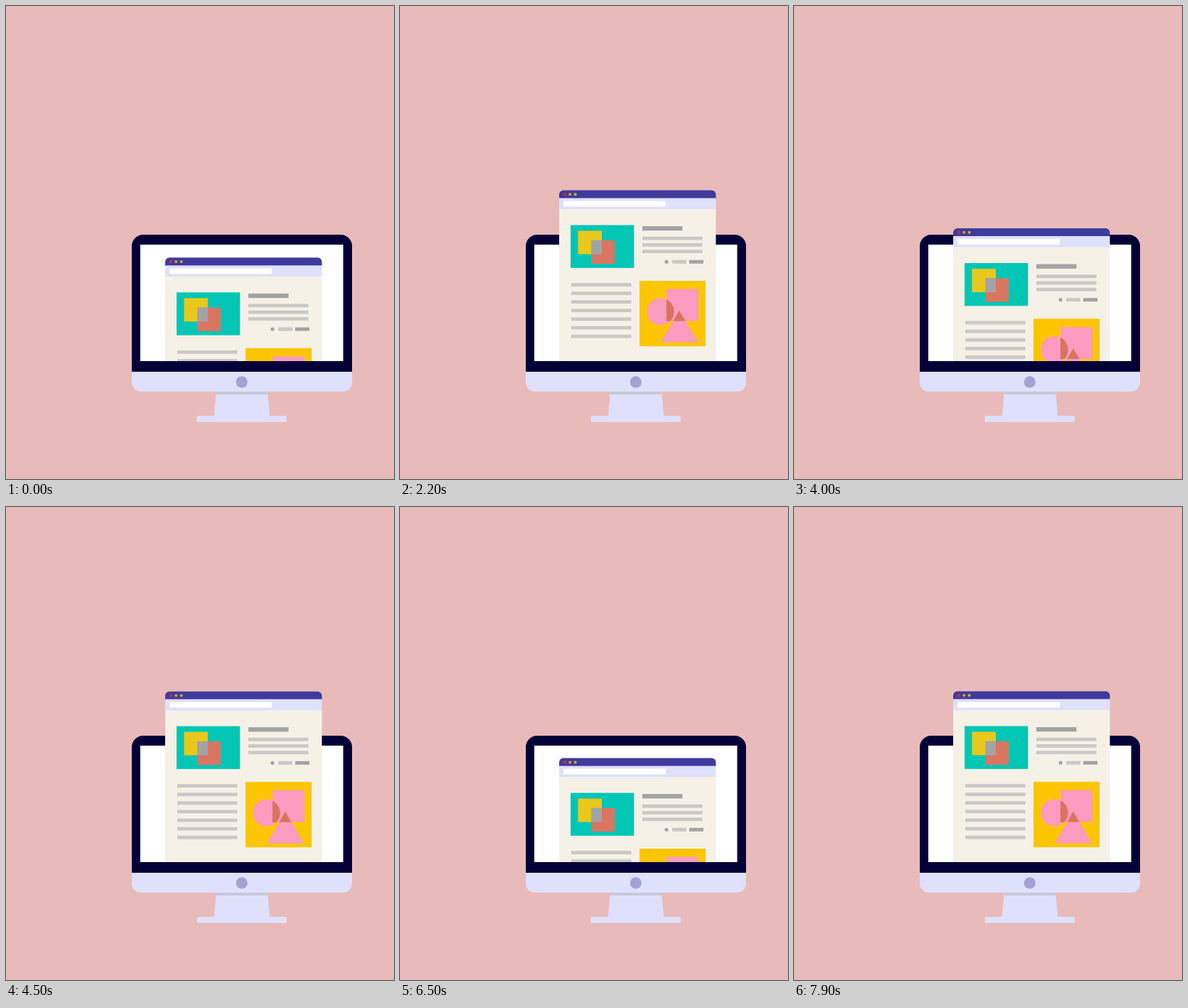
Animation, 546 px wide and 666 px high, one loop 8000 ms. Source, as an HTML page:

```html
<!DOCTYPE html>
<html lang="en">
<head>
<meta charset="utf-8">
<title>Scrolling page</title>
<style>
  html, body { margin: 0; width: 100%; height: 100%; overflow: hidden; background: #e8bbba; }
  svg { display: block; width: 546px; height: 666px; }
  .light { fill: #dfe0fb; }
  .line { fill: #c9c8c6; }
  .dark { fill: #a3a3a4; }
  .pink { fill: #fa9bbf; }
  .overlap { fill: #d9745c; }
</style>
</head>
<body>
<svg viewBox="0 0 546 666">
  <defs>
    <clipPath id="visible"><rect width="546" height="500"/></clipPath>
    <clipPath id="square"><rect x="375" y="139" width="45" height="45"/></clipPath>
  </defs>

  <!-- monitor -->
  <path class="light" d="M296 543H368L371.5 579H292.5Z"/>
  <path fill="#c8c9d8" d="M296 543H368L368.4 547H295.6Z"/>
  <rect class="light" x="268.5" y="577" width="126.5" height="8.7" rx="2"/>
  <path class="light" d="M177 514H487V530a13 13 0 0 1-13 13H190a13 13 0 0 1-13-13Z"/>
  <path fill="#030038" d="M177 515V338a16 16 0 0 1 16-16H471a16 16 0 0 1 16 16V515Z"/>
  <rect fill="#fff" x="189" y="336" width="285.5" height="164"/>
  <circle fill="#a5a1d5" cx="331.8" cy="529.4" r="8.1"/>

  <!-- web page, local y starts at its top edge -->
  <g clip-path="url(#visible)">
    <g id="page" transform="translate(0 354.3)">
      <path fill="#3f3b9d" d="M224 12V6a6 6 0 0 1 6-6H438.5a6 6 0 0 1 6 6V12Z"/>
      <circle fill="#d8252c" cx="232" cy="5.8" r="2.2"/>
      <circle fill="#e39a25" cx="239.3" cy="5.8" r="2"/>
      <circle fill="#b9b836" cx="246.7" cy="5.8" r="2"/>
      <rect class="light" x="224" y="11" width="220.5" height="16"/>
      <rect fill="#fff" x="230" y="15" width="144" height="8"/>
      <rect fill="#f5f1e6" x="224" y="26.5" width="220.5" height="260"/>

      <rect fill="#00c6b5" x="240" y="49" width="89.3" height="60.3"/>
      <rect fill="#e9c81c" x="250.5" y="57" width="33.5" height="33"/>
      <rect fill="#da7562" x="269" y="70.3" width="33" height="33.2"/>
      <rect fill="#a2a3a8" x="269" y="70.3" width="15" height="19.7"/>

      <rect class="dark" x="341" y="50.5" width="56.5" height="6.3"/>
      <circle class="dark" cx="375" cy="100.7" r="2.6"/>
      <rect class="line" x="383" y="98.2" width="20" height="5"/>
      <rect class="dark" x="407" y="98.2" width="20" height="5"/>
      <g id="lines" class="line"></g>

      <rect fill="#fbc600" x="337" y="127.4" width="93" height="92.2"/>
      <rect class="pink" x="375" y="139" width="45" height="45"/>
      <g class="pink"><circle id="disc" cx="366.5" cy="171" r="19"/><path id="cone" d="M393 169.3L419.5 214H367Z"/></g>
      <g class="overlap" clip-path="url(#square)"><use href="#disc" style="fill:#d9745c"/></g>
    </g>
  </g>
</svg>
<script>
  const SVG = 'http://www.w3.org/2000/svg';
  const page = document.getElementById('page');
  const lines = document.getElementById('lines');

  function add(parent, tag, attrs) {
    const el = document.createElementNS(SVG, tag);
    for (const key in attrs) el.setAttribute(key, attrs[key]);
    return parent.appendChild(el);
  }

  function addLines(x, y, gap, count) {
    for (let i = 0; i < count; i++) {
      add(lines, 'rect', { x, y: y + i * gap, width: 84.5, height: 4.8 });
    }
  }
  addLines(341, 65.2, 9.3, 3);
  addLines(241, 130.6, 12.1, 7);

  // Overlaps of the pink shapes with the pink square
  const clipped = add(page, 'g', { class: 'overlap', 'clip-path': 'url(#square)' });
  add(clipped, 'circle', { cx: 366.5, cy: 171, r: 19 });
  add(clipped, 'path', { d: 'M393 169.3L419.5 214H367Z' });

  const LOOP = 8000, CYCLE = 2900, STEP = 100;
  const RISE = 650, FALL = 2330, MOVE = 970;
  const LOW = 354.3, HIGH = 259.5;

  function ease(x) {
    x = Math.min(1, Math.max(0, x));
    return x < 0.5 ? 0.5 * (2 * x) ** 1.84 : 1 - 0.5 * (2 - 2 * x) ** 1.84;
  }

  // The page rests low, rises, holds, then sinks; each cycle starts with a rise
  function pageTop(t) {
    const phase = t < RISE ? 0 : (t - RISE) % CYCLE;
    const lift = ease(phase / MOVE) - ease((phase - FALL + RISE) / MOVE);
    return LOW + (HIGH - LOW) * lift;
  }

  function draw(now) {
    const t = Math.floor((now % LOOP) / STEP) * STEP;
    page.setAttribute('transform', `translate(0 ${pageTop(t).toFixed(2)})`);
    requestAnimationFrame(draw);
  }
  requestAnimationFrame(draw);
</script>
</body>
</html>
```
